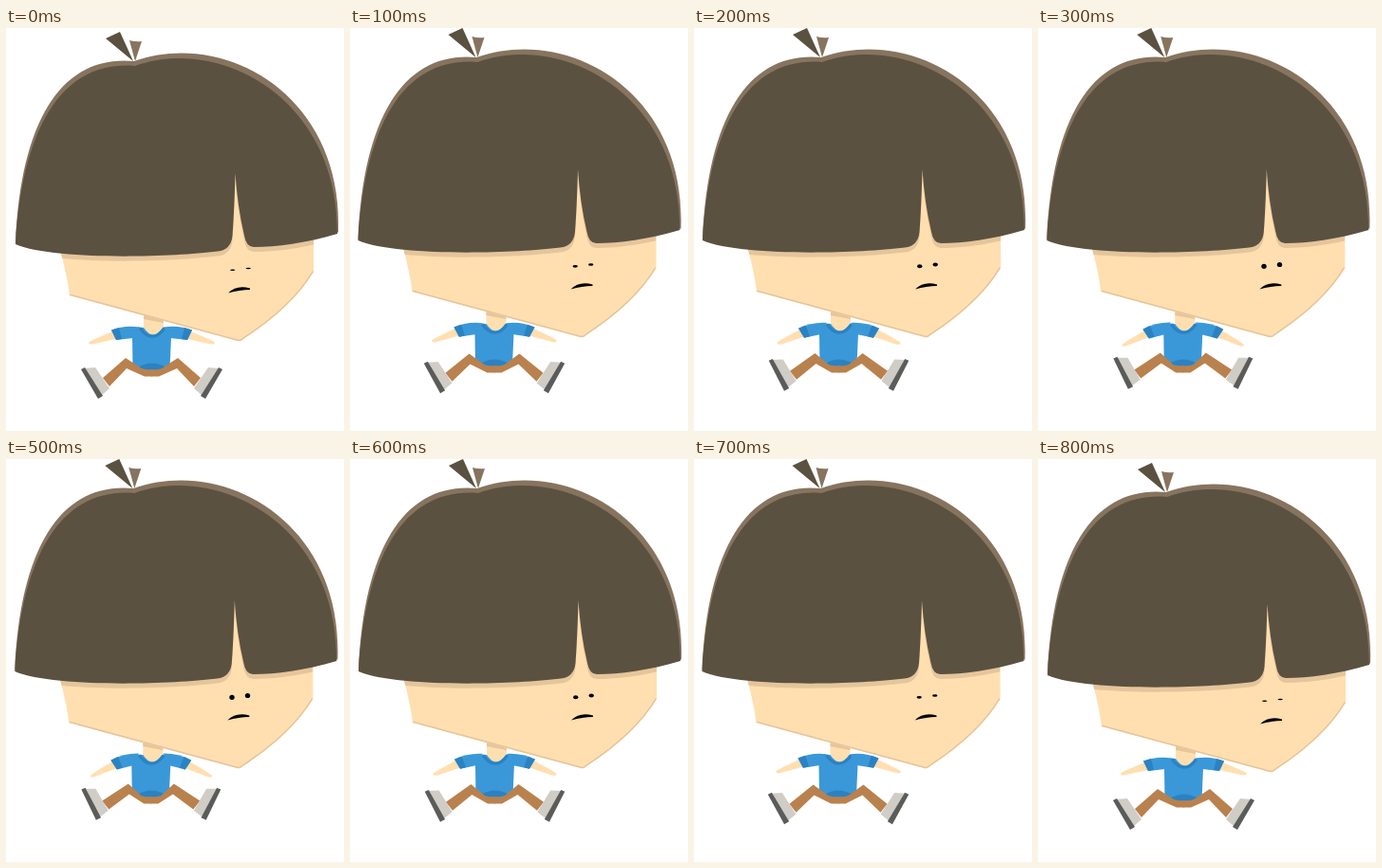
An HTML page that plays this animation: 356x425 px, repeating every 900 ms.

```html
<!DOCTYPE html>
<html lang="en">
<head>
<meta charset="utf-8">
<title>Sitting boy</title>
<style>
  html, body { margin: 0; height: 100%; overflow: hidden; background: #fff; }
  svg { display: block; width: 100%; height: 100%; }
</style>
</head>
<body>
<svg viewBox="0 0 356 425">
  <defs>
    <path id="face" d="M57 234Q65 264 67 282L244 330Q247 331 250 328Q302 294 324 257V210L241 140Z"/>
    <path id="hair" d="M10 228C18 96 64 34 136 40C224 8 350 73 349 217C315 227 285 231 261 231
      Q253 231 251 219C246 198 243 176 241.500 153C241 172 240 200 238.500 219Q237 234 223 235.500C170 242 50 245 10 228Z"/>
    <clipPath id="faceClip"><use href="#face"/></clipPath>
  </defs>
  <g id="boy">
    <path fill="#ffdfb0" d="M145 300H166V320Q155 332 145 320Z"/>
    <path fill="#e5c59b" d="M145 300H166V311L145 307Z"/>

    <path fill="#3a98d8" d="M139 315.500L145 316Q155 331 165 316L168 315.500L174 326L172.500 359Q153 364 133.500 359L133 326Z"/>
    <path fill="none" stroke="#2b82c2" stroke-width="3" d="M141 316.500Q154 334 167 316.500"/>
    <path fill="#2b82c2" d="M139 358Q153 349 169 358L160 364H146Z"/>

    <g id="side">
      <g id="arm">
        <path fill="#ffdfb0" d="M87 331.500Q90 329 115 319L120 327L91 333.500Q87 334 87 331.500Z"/>
        <path fill="#3a98d8" d="M111 318.500Q125 313 141 315.500L134 327L116 329Z"/>
        <path fill="#2b82c2" d="M111 318.500L119 316L122 328L116 329Z"/>
      </g>
      <path id="leg" fill="#b9814d"/>
      <g id="shoe">
        <path fill="#d0ccc6" d="M82 359L94 358L109 380L100 388Z"/>
        <path fill="#5a5c5a" d="M79 360L83 358L102 388L97 391Z"/>
      </g>
    </g>
    <use href="#side" transform="translate(307 0) scale(-1 1)"/>

    <use href="#face" fill="#ffdfb0"/>
    <g clip-path="url(#faceClip)" fill="#e5c59b">
      <use href="#hair" y="5"/>
      <path fill="none" stroke="#e5c59b" stroke-width="3" d="M67 282L244 330Q247 331 250 328Q302 294 324 257"/>
    </g>
    <path fill="#87745f" d="M10 227C16 90 63 28 135 35C232 1 356 72 350 216L330 200L136 60L20 210Z"/>
    <use href="#hair" fill="#5b5140"/>
    <path fill="#5b5140" d="M105 11L120 4L134 35Z"/>
    <path fill="#87745f" d="M130 13Q137 15 143 14L136 35Z"/>

    <ellipse class="eye" cx="238.700" cy="255.300" rx="2.700"/>
    <ellipse class="eye" cx="255.200" cy="253.500" rx="2.700"/>
    <path d="M234 279.500Q243 270.500 257 274.500V276Q246 276 234 279.500Z"/>
  </g>
</svg>
<script>
  const STEP = 100, STEPS = 9;
  // Half of the back-and-forth cycle: body offset and how far limbs and eyes have opened.
  const poses = [
    { x: 0, y: 0, open: 0 },
    { x: -1.5, y: -4, open: 0.3 },
    { x: -1, y: -4, open: 0.7 },
    { x: -0.7, y: -4, open: 1 },
    { x: -0.7, y: -4, open: 1.1 }
  ];
  const part = id => document.getElementById(id);
  const boy = part("boy"), arm = part("arm"), leg = part("leg"), shoe = part("shoe");
  const eyes = document.querySelectorAll(".eye");

  function legPath(open) {
    const kneeX = 126 + 3.5 * open, kneeY = 348 - 1.5 * open, ankleY = 369 - 4.5 * open;
    return `M102 ${ankleY}L${kneeX} ${kneeY}L143 359Q148 361 154 360V367.5H146
      L${kneeX + 1} ${kneeY + 11}L109 ${ankleY + 9}Z`;
  }

  function draw(now) {
    const step = Math.floor(now / STEP) % STEPS;
    const { x, y, open } = poses[4 - Math.abs(4 - step)];
    boy.setAttribute("transform", `translate(${x} ${y})`);
    arm.setAttribute("transform", `rotate(${-8 * open} 134 319)`);
    shoe.setAttribute("transform", `translate(0 ${-6.5 * open}) rotate(${4.5 * open} 92 373)`);
    leg.setAttribute("d", legPath(open));
    eyes.forEach(eye => eye.setAttribute("ry", 0.8 + 1.8 * open));
    requestAnimationFrame(draw);
  }
  draw(performance.now());
</script>
</body>
</html>
```
